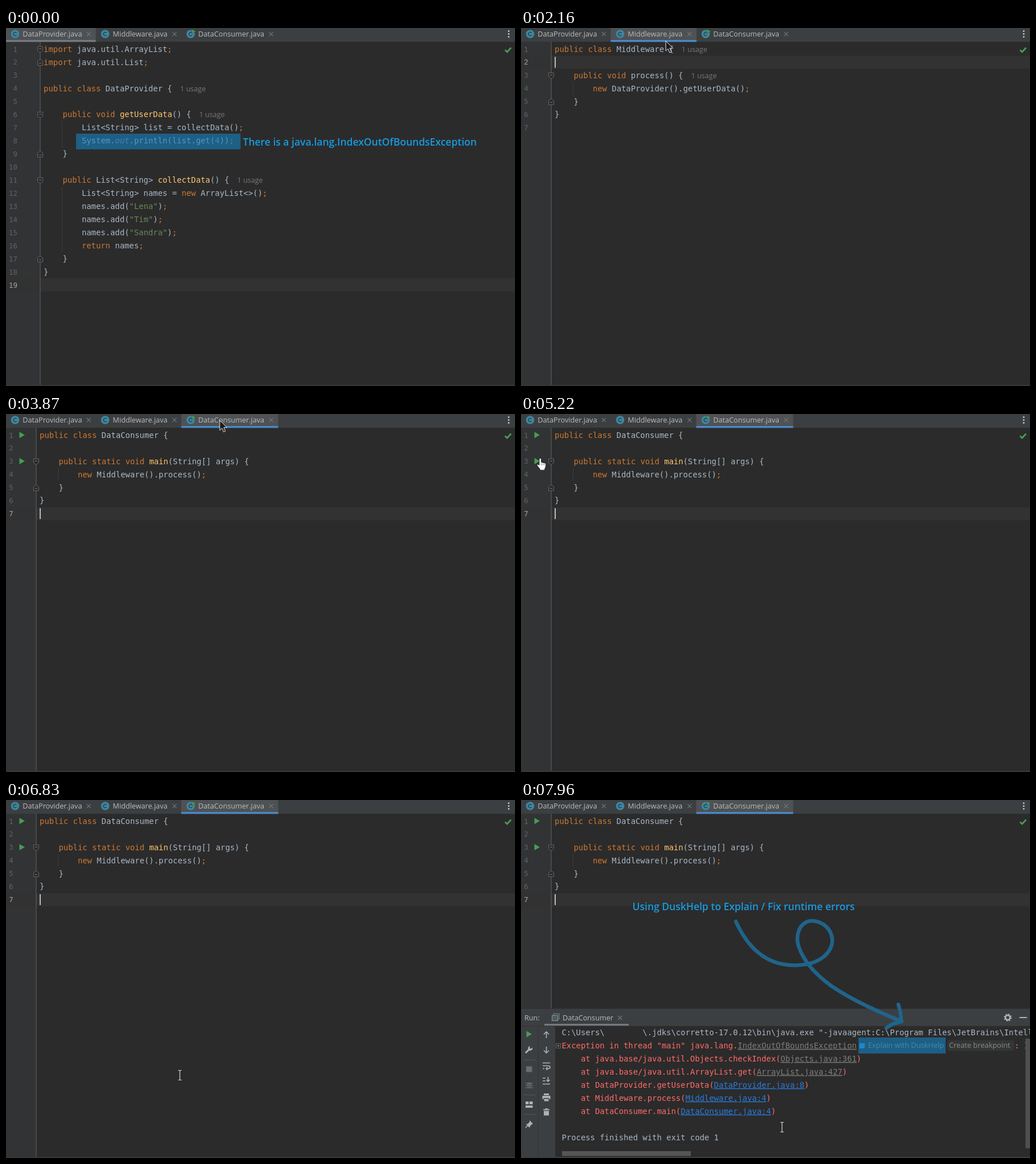
An HTML page that plays this animation: 893 px wide and 627 px high, repeating every 7990 ms.

```html
<!DOCTYPE html>
<html lang="en">
<head>
<meta charset="utf-8">
<title>Runtime error in the editor</title>
<style>
html, body { margin: 0; width: 100%; height: 100%; overflow: hidden; background: #2b2b2b; }
svg { display: block; width: 100%; height: 100%; }
text { white-space: pre; }
.mono { font: 13.87px "DejaVu Sans Mono", monospace; fill: #a9b7c6; }
.num { font: 12.4px "DejaVu Sans Mono", monospace; fill: #606366; text-anchor: end; }
.ui { font: 12.65px "Open Sans", sans-serif; fill: #bbb; }
.note { font: 600 17.5px "Open Sans", sans-serif; fill: #179be1; }
.line { fill: none; stroke: #afb1b3; stroke-width: 1.6; }
.u { text-decoration: underline; }
</style>
</head>
<body>
<svg id="stage" viewBox="0 0 893 627"></svg>
<script>
const LOOP = 7990, CHAR = 8.35, ROW = 22.95;
const OVERLAY = 'rgba(23,130,193,.6)', GREEN = '#499c54';

const rect = (x, y, w, h, fill, extra = '') =>
  `<rect x="${x}" y="${y}" width="${w}" height="${h}" fill="${fill}" ${extra}/>`;
const path = (d, extra = 'class="line"') => `<path d="${d}" ${extra}/>`;
const text = (x, y, s, cls, extra = '') =>
  `<text x="${x}" y="${y}" class="${cls}" ${extra}>${s}</text>`;
const group = (id, s) => `<g id="${id}">${s}</g>`;
const play = (x, y, fill = GREEN) => path(`M${x} ${y - 5.5}l9.5 5.5l-9.5 5.5z`, `fill="${fill}"`);
const close = (x, y) => path(`M${x - 3.5} ${y - 3.5}l7 7m0 -7l-7 7`, 'stroke="#75787a" stroke-width="1.1"');
const escape = s => s.replace(/&/g, '&amp;').replace(/</g, '&lt;').replace(/>/g, '&gt;');

// Editor contents; a trailing "#" marks a usage hint
const files = [
  { current: 19, left: 60, folds: { 1: 1, 2: -1, 6: 1, 9: -1, 11: 1, 17: -1 }, guides: [[7, 8], [12, 16]], code:
`import java.util.ArrayList;
import java.util.List;

public class DataProvider {#

    public void getUserData() {#
        List<String> list = collectData();
        System.out.println(list.get(4));
    }

    public List<String> collectData() {#
        List<String> names = new ArrayList<>();
        names.add("Lena");
        names.add("Tim");
        names.add("Sandra");
        return names;
    }
}
` },
  { current: 2, left: 53, folds: { 3: 1, 5: -1 }, guides: [[4, 4]], code:
`public class Middleware {#

    public void process() {#
        new DataProvider().getUserData();
    }
}
` },
  { current: 7, left: 53, folds: { 3: 1, 5: -1 }, guides: [[4, 4]], runnable: [1, 3], code:
`public class DataConsumer {

    public static void main(String[] args) {
        new Middleware().process();
    }
}
` }
];

const styles = {
  keyword: 'fill="#cc7832"', string: 'fill="#6a8759"', number: 'fill="#6897bb"',
  method: 'fill="#ffc66d"', field: 'fill="#9876aa" font-style="italic"'
};
const syntax = new RegExp([
  '(?<keyword>\\b(?:import|public|class|void|new|return|static)\\b|;)',
  '(?<string>"[^"]*")', '(?<number>\\b\\d+\\b)', '(?<field>\\bout\\b)',
  '(?<method>(?:getUserData|collectData)(?=\\(\\) \\{)|\\bmain\\b)'
].join('|'), 'g');

function highlight(line) {
  let html = '', last = 0;
  for (const m of line.matchAll(syntax)) {
    const kind = Object.keys(styles).find(k => m.groups[k]);
    html += escape(line.slice(last, m.index)) + `<tspan ${styles[kind]}>${m[0]}</tspan>`;
    last = m.index + m[0].length;
  }
  return html + escape(line.slice(last));
}

const rowTop = n => 25.5 + (n - 1) * ROW;

function foldMark(x, y, dir) {
  const a = -5 * dir, b = 2 * dir, c = 5.5 * dir;
  return path(`M${x - 4.5} ${y + a}h9V${y + b}L${x} ${y + c}L${x - 4.5} ${y + b}z`,
    'fill="#2b2b2b" stroke="#626567"') + path(`M${x - 2.2} ${y - dir}h4.4`, 'stroke="#777a7c"');
}

function editor(file, i) {
  const { left, current } = file, x0 = left + 6.1;
  let s = rect(0, 24, left, 603, '#313335') + rect(0, rowTop(current), 893, ROW, '#323232');
  for (const [a, b] of file.guides)
    s += rect(left + 38, rowTop(a), 1, (b - a + 1) * ROW, '#393b3c');
  s += rect(left - .5, 24, 1, 601, '#606366');
  file.code.split('\n').forEach((raw, k) => {
    const n = k + 1, base = rowTop(n) + 16.2;
    s += text(left === 60 ? 20 : 12.6, base - .2, n, 'num', n === current ? 'style="fill:#a4a3a3"' : '');
    const line = raw.replace('#', ''), body = line.trimStart();
    s += text(x0 + (line.length - body.length) * CHAR, base, highlight(body), 'mono');
    if (raw.endsWith('#'))
      s += text(x0 + line.length * CHAR + 14, base, '1 usage', 'ui', 'style="fill:#787878;font-size:12.5px"');
    if (file.folds[n]) s += foldMark(left, rowTop(n) + 12, file.folds[n]);
  });
  for (const n of file.runnable || []) s += play(23.5, rowTop(n) + 11.2);
  return group('file' + i, s);
}

const tabs = [
  { name: 'DataProvider.java', x: 0, w: 157.5, icon: 16 },
  { name: 'Middleware.java', x: 157.5, w: 150.5, icon: 174 },
  { name: 'DataConsumer.java', x: 307.5, w: 170, icon: 324 }
];
const tabBar = rect(0, 0, 893, 24, '#3c3f41') + tabs.map((tab, i) =>
  rect(tab.x, 0, tab.w, 24, 'none', `id="tab${i}"`) +
  rect(tab.x, 21, tab.w, 3.4, 'none', `id="bar${i}"`) +
  `<circle cx="${tab.icon}" cy="10.5" r="7.3" fill="#3e86a0"/>` +
  path(`M${tab.icon + 2.6} 8.6a3.1 3.1 0 1 0 0 3.8`, 'fill="none" stroke="#24434f" stroke-width="1.5"') +
  (i === 2 ? path('M326 2l7 4l-7 4z', `fill="${GREEN}" stroke="#3c3f41" stroke-width=".6"`) : '') +
  text(tab.icon + 13.3, 15.3, tab.name, 'ui') + close(tab.x + tab.w - 12.3, 10.7)
).join('') + [5.5, 10.5, 15.5].map(y => rect(880.7, y - 1.3, 2.6, 2.6, '#c2c4c6')).join('');

const callout = rect(123, 185, 288.5, 27.5, OVERLAY) +
  text(415.5, 205.5, 'There is a java.lang.IndexOutOfBoundsException', 'note');

// Gutter context menu
const menuText = (y, s) => text(64, y + 4.6, s, 'ui', 'style="font-size:12.85px"');
const bug = (x, y, color) =>
  `<ellipse cx="${x}" cy="${y + .5}" rx="3.8" ry="5" fill="${color}"/>` +
  path(`M${x - 6.5} ${y - 3}h13m-13 4h13m-13 4h13`, `stroke="${color}" stroke-width="1.5"`) +
  path(`M${x - 3} ${y}h6m-6 3h6`, 'stroke="#3c3f41"');
const menu = rect(30.5, 71.5, 340, 99, '#3c3f41', 'stroke="#616365"') +
  rect(31, 77, 339, 22, '#4b6eaf') + play(46, 88) + bug(50.5, 110, GREEN) +
  path('M43.5 127l5.5 -1.5l5.5 1.5v5q-1 5 -5.5 6.5q-5 -2 -5.5 -6.5z', 'fill="#afb1b3"') +
  path('M49 127h4v4h-4z', 'fill="#3c3f41"') + path('M51 130l7 4.5l-7 4.5z', `fill="${GREEN}"`) +
  menuText(88, `R<tspan class="u">u</tspan>n 'DataConsumer.main()'`) +
  menuText(110, `<tspan class="u">D</tspan>ebug 'DataConsumer.main()'`) +
  menuText(132, `Run 'DataConsumer.main()' with Co<tspan class="u">v</tspan>erage`) +
  menuText(154, 'Modify Run Configuration...') +
  text(359, 92.6, 'Ctrl+Shift+F10', 'ui', 'text-anchor="end"');

// Run tool window
const gear = `<circle cx="854" cy="381" r="4" fill="none" stroke="#afb1b3" stroke-width="2.6"/>` +
  `<circle cx="854" cy="381" r="5.8" fill="none" stroke="#afb1b3" stroke-width="2" stroke-dasharray="2.5 2.05"/>`;
const toolbar = play(9.5, 410) +
  path('M8 443l6.5 -6.5', 'stroke="#afb1b3" stroke-width="3"') +
  path('M20 433.5a4 4 0 1 1 -4 -2.5l-1 3l2 2z', 'fill="#afb1b3"') +
  rect(9, 466.5, 10.5, 10, '#696b6d') + bug(14.5, 499, '#66696b') +
  rect(8, 528, 5.5, 5, '#afb1b3') + rect(15, 528, 5.5, 5, '#afb1b3') + rect(8, 535, 12.5, 4, '#afb1b3') +
  [455, 516, 550].map(y => rect(5, y, 20, 1, '#555759')).join('') +
  path('M8 574l5 -5') + path('M15 561l6 6l-2 1l-3 3l-1 3l-6 -6l3 -1l3 -3z', 'fill="#afb1b3"') +
  path('M44.5 417v-11m-4.5 4.5l4.5 -4.5l4.5 4.5M44.5 432v11m-4.5 -4.5l4.5 4.5l4.5 -4.5') +
  path('M38 460.5h13M38 465.5h10q3 0 3 2.5t-3 2.5h-4m2.5 -2.5l-2.5 2.5l2.5 2.5M38 470.5h3') +
  path('M38 497.5h13M38 487h5m-5 5h5M47.5 485v8m-3 -3l3 3l3 -3') +
  path('M40 514h9v3h-9zM37.5 518h14v6h-2v-2h-10v2h-2zM40.5 523.5h8v4h-8z', 'fill="#afb1b3"') +
  path('M39 541.5h11v1.8h-11zM42.5 540h4v2h-4zM40 544.5h9v8h-9z', 'fill="#afb1b3"');

const link = (s, color) => `<tspan class="u" fill="${color}">${s}</tspan>`;
const lib = s => link(s, '#7d7d7d'), own = s => link(s, '#287bde');
const frames = [
  `java.base/java.util.Objects.checkIndex(${lib('Objects.java:361')})`,
  `java.base/java.util.ArrayList.get(${lib('ArrayList.java:427')})`,
  `DataProvider.getUserData(${own('DataProvider.java:8')})`,
  `Middleware.process(${own('Middleware.java:4')})`,
  `DataConsumer.main(${own('DataConsumer.java:4')})`
];
const outputRow = n => 412 + n * 22.97;
const RED = 'style="fill:#ff6b68"';
const output =
  text(71.5, outputRow(0), 'C:\\Users\\' + ' '.repeat(8) +
    '\\.jdks\\corretto-17.0.12\\bin\\java.exe "-javaagent:C:\\Program Files\\JetBrains\\IntelliJ', 'mono') +
  text(71.5, outputRow(1), `Exception in thread "main" java.lang.${lib('IndexOutOfBoundsException')}`, 'mono', RED) +
  text(866, outputRow(1), ': Index', 'mono', RED) +
  frames.map((s, i) => text(71.5 + 4 * CHAR, outputRow(i + 2), 'at ' + s, 'mono', RED)).join('') +
  text(71.5, outputRow(8), 'Process finished with exit code 1', 'mono') +
  rect(61.5, 426.5, 8, 8, 'none', 'stroke="#626567"') + path('M63 430.5h5m-2.5 -2.5v5', 'stroke="#777a7c"') +
  rect(748, 420.5, 117, 19, '#343535', 'rx="4"') +
  text(751, 434.3, 'Create breakpoint', 'ui', 'style="fill:#8a8a8a;font-size:12.8px"') +
  rect(594, 426, 9, 9, '#2196e0') +
  text(609, 434.3, 'Explain with DuskHelp', 'ui', 'style="fill:#8f8f8f;font-size:12.8px"');

const panel = rect(0, 365, 893, 262, '#3c3f41') + rect(0, 365, 893, 1, '#323232') +
  text(6, 385.6, 'Run:', 'ui') +
  rect(57, 374.5, 10, 9, 'none', 'stroke="#7f8b91"') + rect(54.5, 377.5, 10, 9, '#4b5b63', 'stroke="#8c989e"') +
  text(73, 385.6, 'DataConsumer', 'ui') + close(173.5, 381.5) + rect(41, 392, 148, 3.4, '#747a80') +
  gear + rect(874.5, 380, 13, 2, '#afb1b3') +
  rect(60, 396, 833, 229, '#2b2b2b') + rect(0, 395.5, 893, 1, '#323232') + rect(30, 396, 1, 229, '#323232') + toolbar +
  group('output', output + rect(885, 418, 8, 192, '#4d4f50') + rect(72, 615, 226, 8.5, '#535556')) +
  rect(0, 625, 893, 2, '#3c3f41');

const guide = rect(592, 416, 153, 28, OVERLAY) +
  text(195.5, 192.7, 'Using DuskHelp to Explain / Fix runtime errors', 'note') +
  path('M377 213C393 248 420 285 470 289C525 293 548 265 546 243C543 220 522 210 506 212' +
    'C488 216 481 238 487 256C496 284 520 308 545 326C580 350 625 370 668 388M662 358Q667 374 667 388Q652 391 641 399',
    'fill="none" stroke="#20648b" stroke-width="6.5" stroke-linecap="round" stroke-linejoin="round"');

const pointers =
  group('arrow', path('M0 0V17.5L4 13.8L6.8 20.5L9.8 19.2L7 12.7H12.6Z', 'fill="#1b1b1b" stroke="#e8e8e8"')) +
  group('hand', path('M-2 1.5q0 -2 1.8 -2q1.8 0 1.8 2v5l6 1.3q2.4 .7 2.2 3l-.6 4l-1.6 3.5v2h-8.5v-2l-4.7 -6q-1 -2 .8 -2.4l2.8 1.6z',
    'fill="#fff" stroke="#222" stroke-width=".9"') + path('M2 8v4m2.7 -3.5v3.5m2.6 -3v3', 'stroke="#555" stroke-width=".7"')) +
  group('beam', path('M-3 -8.5h2.2l.8 .8l.8 -.8h2.2M0 -8v16M-3 8.5h2.2l.8 -.8l.8 .8h2.2',
    'fill="none" stroke="#d8d8d8" stroke-width="1.2"'));

document.getElementById('stage').innerHTML =
  rect(0, 0, 893, 627, '#2b2b2b') + files.map(editor).join('') +
  rect(0, 625, 893, 2, '#36393b') + rect(59, 50.5, 2, 19, '#bbb', 'id="caret"') +
  path('M875.5 38.5l3.7 3.5l6.8 -7.5', `fill="none" stroke="${GREEN}" stroke-width="2.7"`) + tabBar +
  group('callout', callout) + group('menu', menu) + group('panel', panel) + group('guide', guide) +
  group('pointer', pointers);

const $ = id => document.getElementById(id);
const show = (id, on) => $(id).setAttribute('display', on ? 'inline' : 'none');
const within = (t, a, b) => t >= a && t < b;

// Pointer stops: time, x, y
const stops = [
  [1460, 256, 18], [1880, 252, 14], [2130, 252, 14], [2400, 306, 249], [3200, 306, 249], [3230, 306, 241],
  [3710, 375, 11], [4019, 375, 11], [4020, 384, 14], [5219, 384, 14], [5220, 34, 78], [5400, 30, 72],
  [5760, 30, 72], [5970, 48, 90], [6620, 48, 90], [6830, 305, 482], [7660, 305, 482], [7960, 458, 573], [LOOP, 458, 573]
];
function pointerAt(t) {
  const i = Math.max(1, stops.findIndex(s => s[0] > t));
  const [t0, x0, y0] = stops[i - 1], [t1, x1, y1] = stops[i];
  const k = Math.min(1, Math.max(0, (t - t0) / (t1 - t0))), e = k * k * (3 - 2 * k);
  return [x0 + (x1 - x0) * e, y0 + (y1 - y0) * e];
}

// Times at which the caret is visible
const caretOn = [[1760, 2250], [2740, 3230], [3710, 4360], [4850, 5340], [6280, 7200], [7690, LOOP]];

function render(t) {
  const active = t < 1760 ? 0 : t < 3870 ? 1 : 2;
  const menuOpen = within(t, 5580, 6250);
  const focused = active > 0 && !menuOpen;
  const [x, y] = pointerAt(t);

  tabs.forEach((tab, i) => {
    const hover = t >= 1460 && y < 24 && x >= tab.x && x < tab.x + tab.w;
    show('file' + i, i === active);
    $('tab' + i).setAttribute('fill', i === active ? '#4e5254' : hover ? '#292b2d' : 'none');
    $('bar' + i).setAttribute('fill', i !== active ? 'none' : focused ? '#4a88c7' : '#747a80');
  });

  show('caret', caretOn.some(([a, b]) => within(t, a, b)));
  $('caret').setAttribute('y', active === 1 ? 50.5 : 165);
  show('callout', t < 500);
  show('menu', menuOpen);
  show('panel', t >= 6860);
  show('output', t >= 6890);
  show('guide', t >= 6920);

  const shape = within(t, 5220, 5580) ? 'hand' : y < 24 || x < 53 ? 'arrow' : 'beam';
  show('pointer', t >= 1460);
  for (const id of ['arrow', 'hand', 'beam']) show(id, id === shape);
  $('pointer').setAttribute('transform', `translate(${x.toFixed(1)} ${y.toFixed(1)})`);
}

const start = performance.now();
function tick() {
  render((performance.now() - start) % LOOP);
  requestAnimationFrame(tick);
}
tick();
</script>
</body>
</html>
```
